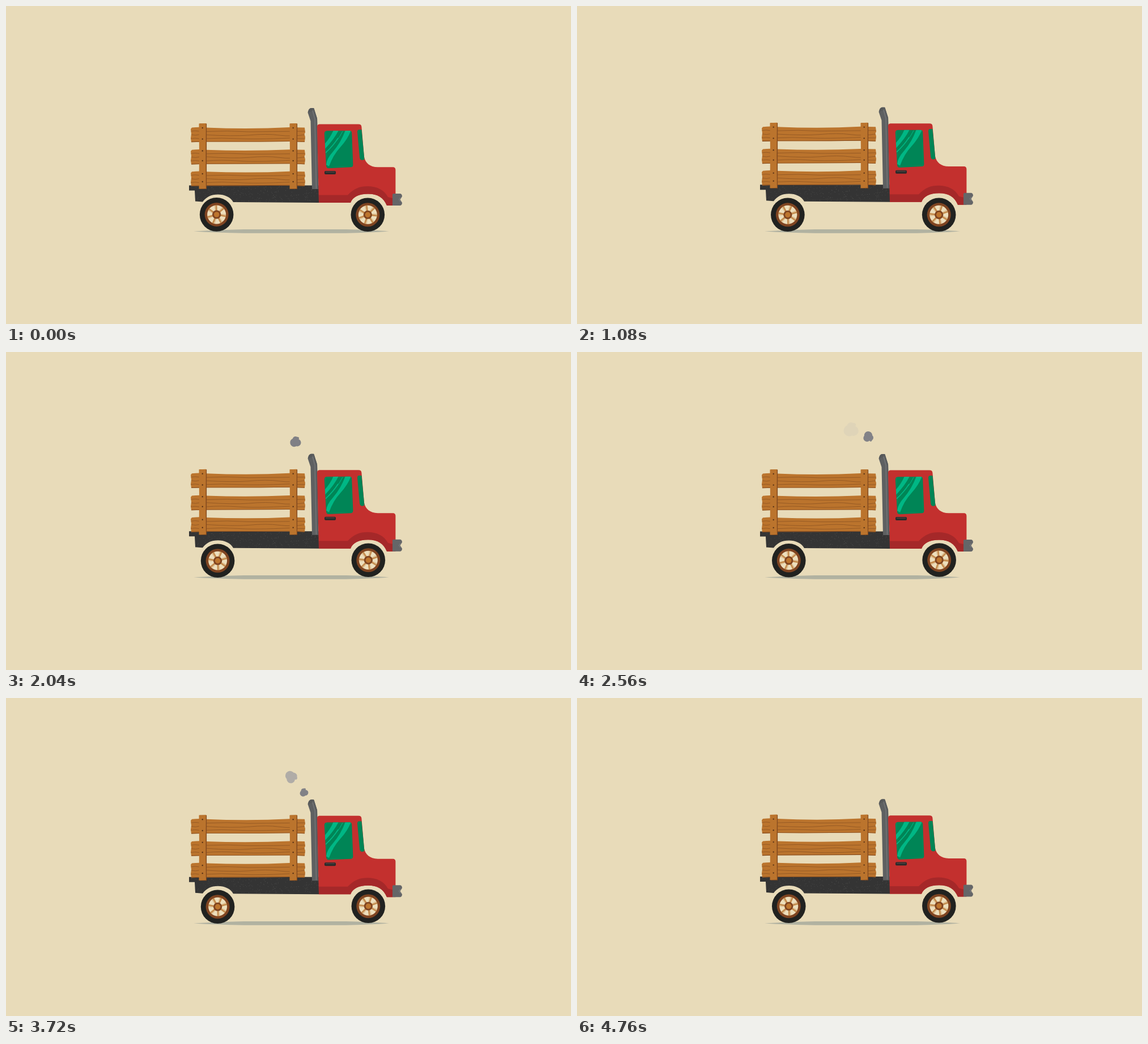
These frames come from a looping animation (997 by 561 pixels, 4800 ms). An HTML page with a canvas:

```html
<!DOCTYPE html>
<html lang="en">
<head>
<meta charset="utf-8">
<title>Truck</title>
<style>
html, body { margin: 0; width: 100%; height: 100%; overflow: hidden; background: #e8dbb9; }
canvas { display: block; }
</style>
</head>
<body>
<canvas id="stage" width="997" height="561"></canvas>
<script>
const ctx = document.getElementById('stage').getContext('2d');
const LOOP = 4800, STEP = 40, TAU = Math.PI * 2;
const CREAM = '#e8dbb9', WOOD = '#bb742d', WOOD_DARK = '#834a1f', GRAIN = '#8a5222';
const RED = '#c3302e', RED_DARK = '#a52829', GLASS = '#008556', SHINE = '#00b785';

function fill(d, color) {
  ctx.fillStyle = color;
  ctx.fill(new Path2D(d));
}

function line(d, color, width) {
  ctx.strokeStyle = color;
  ctx.lineWidth = width;
  ctx.stroke(new Path2D(d));
}

function disc(x, y, r, color) {
  ctx.fillStyle = color;
  ctx.beginPath();
  ctx.arc(x, y, r, 0, TAU);
  ctx.fill();
}

function clipped(d, draw) {
  ctx.save();
  ctx.clip(new Path2D(d));
  draw();
  ctx.restore();
}

function random(seed) {
  return () => {
    seed = (seed * 16807) % 2147483647;
    return seed / 2147483647;
  };
}

function drawShadow() {
  fill('M331 397.5 Q375 394.5 420 394 H600 Q640 394.5 676 397.5 Q640 400 600 400.8 H420 Q370 400 331 397.5Z', '#b1b2a1');
}

function drawPlank(y, sway) {
  const shape = `M326 3 L328 0.5 Q342 -1 353 0.5 Q430 ${3.5 + sway} 500 0 L527 0.5 L528 9 L526.5 12 L528 17
    L527 26 L500 25 Q425 ${25.5 + sway} 353 25.5 L327 26.3 L326 19 L327 12Z`;
  clipped(shape, () => {
    ctx.fillStyle = WOOD;
    ctx.fillRect(320, -3 + y, 212, 34);
  });
  ctx.save();
  ctx.translate(0, y);
  fill(shape, WOOD);
  clipped(shape, () => {
    line(`M326 7 Q334 5.5 341 7 M353 7.5 Q390 5.5 428 8 Q465 ${8 - sway} 528 7
      M326 13 Q335 15 341 13 M353 ${13 + sway} Q400 16 428 14 Q460 11 482 14 T528 13
      M326 20 Q334 18.5 341 20 M353 20 Q380 ${18 + sway} 410 20 T501 19 M513 20 H528`, GRAIN, 0.75);
    line(`M326 26 L353 25.5 Q425 ${25.5 + sway} 500 25 L528 26`, WOOD_DARK, 1.6);
  });
  ctx.restore();
}

function drawPost(x) {
  ctx.fillStyle = WOOD_DARK;
  ctx.fillRect(x + 1, 207.5, 12.6, 115.5);
  fill(`M${x} 207.5 L${x + 12.4} 207 L${x + 12} 265 L${x + 12.4} 322 L${x} 322.5 L${x + 0.5} 260Z`, WOOD);
  for (const y of [215, 234.7, 255.5, 273, 296, 310]) disc(x + 6.2, y, 1.2, '#5a3418');
}

function drawBed() {
  const shape = 'M323 316.5 H552 V347 L401 346 C396 337 386 332.5 374 332.5 C362 332.5 353 337 347 345.5 L334 344.5 L333 325.5 H323Z';
  clipped(shape, () => {
    ctx.fillStyle = '#343434';
    ctx.fillRect(320, 315, 235, 35);
    const next = random(71);
    ctx.fillStyle = '#545452';
    for (let i = 0; i < 230; i++) {
      ctx.fillRect(324 + next() * 227, 318 + next() * 28, 0.8, 0.8);
    }
  });
}

function drawPipe() {
  fill('M532.5 188 Q534 180.5 538 180 L543 180 L549 198 L551.5 323 H540 L537.5 203Z', '#5e6061');
  line('M541 185 L545 200 L547.5 322', '#76787a', 1.3);
  line('M543 180.5 L548.6 199 L551 322', '#505355', 1);
  fill('M533 188 Q534 181 538 180 L543 180 L538.5 186Z', '#565859');
}

function drawCab() {
  const body = `M549 213 Q549 209 553 208.6 H622 Q627 208.6 627.4 213 L632 266 C634 277 642 284 656 284.4
    H683 Q687 284.4 687.4 289 V352 H672 C666 338 656 331.6 639 331.6 C622 331.6 612 337 608 347 H552Z`;
  clipped(body, () => {
    ctx.fillStyle = RED;
    ctx.fillRect(545, 205, 145, 150);
    fill('M552 333.5 H603 C614 322 624 318 638 318 C654 318 667 324 674 337 L682 339 V353 H552Z', RED_DARK);
  });

  const pane = 'M561.8 225 Q562 220.5 566 220.2 L606 220 Q610 220 610.2 224 L612.4 280 Q612.4 284 609 284.4 L569 286.3 Q565.5 286 565 282Z';
  clipped(pane, () => {
    ctx.fillStyle = GLASS;
    ctx.fillRect(558, 216, 58, 74);
    fill('M578 219 H587 Q580 234 563 252 L562.5 243 Q572 233 578 219Z', SHINE);
    fill('M599 219 H609 Q603 235 590 249 Q577 263 570 283 L565 280 Q566 269 577 257 Q591 241 599 219Z', SHINE);
    line('M586 233 Q578 246 564 259', SHINE, 1.6);
    line('M594 221 Q589 231 584 237', SHINE, 1);
  });
  fill('M620 222 Q620 218.5 623 218.3 H627.4 L632.4 270.8 Q626 274 624.2 268Z', GLASS);

  ctx.fillStyle = '#2b2b2b';
  ctx.beginPath();
  ctx.roundRect(562, 291, 20, 6, 2);
  ctx.fill();
  line('M564 293 H580', '#67504c', 0.9);

  fill('M682 332.5 Q682 331 684 331 H696 Q699 332 699 336 L695.5 341.5 L699 347 Q699 351 696 352 H682Z', '#656668');
  line('M696 338 L693.5 341.5 L696 345', '#858687', 1);
}

function drawSpokes(angle) {
  ctx.beginPath();
  for (let i = 0; i < 7; i++) {
    const a = angle + i * TAU / 7;
    ctx.moveTo(0, 0);
    ctx.lineTo(17 * Math.cos(a), 17 * Math.sin(a));
  }
  ctx.stroke();
}

// The wheel sits slightly off its axle, so it circles while it spins.
function drawWheel(x, y, wobble, phase, time) {
  const turn = time / 560 * TAU + phase;
  ctx.save();
  ctx.translate(x + wobble * Math.cos(turn), y + wobble * Math.sin(turn));
  disc(0, 0, 29.8, '#212220');
  disc(0, 0, 21, '#7f4421');
  disc(0, 0, 16.5, '#eddfbd');
  ctx.strokeStyle = '#b9742f';
  ctx.lineWidth = 2.8;
  ctx.globalAlpha = 0.25;
  drawSpokes(turn - 0.16);
  ctx.globalAlpha = 0.75;
  drawSpokes(turn);
  ctx.globalAlpha = 1;
  disc(0, 0, 7.6, '#7f4421');
  disc(0, 0, 4.7, '#bd752e');
  ctx.restore();
}

const puffs = [
  { start: 240, life: 760, x: 511, y: 140, size: 0.96, tilt: 0 },
  { start: 1240, life: 760, x: 505, y: 138, size: 1, tilt: 2 },
  { start: 1820, life: 760, x: 484, y: 138, size: 1.2, tilt: 5.3 },
  { start: 2200, life: 760, x: 504, y: 138, size: 1, tilt: 1 },
  { start: 3060, life: 760, x: 502, y: 139, size: 1, tilt: 0.3 },
  { start: 3540, life: 560, x: 516, y: 156, size: 0.9, tilt: 5 },
  { start: 4200, life: 520, x: 503, y: 138, size: 0.95, tilt: 3 }
];

function drawPuff({ start, life, x, y, size, tilt }, time) {
  const age = (time - start) / life;
  if (age <= 0 || age >= 1) return;
  const rise = 1 - (1 - age) ** 2;
  const scale = (5 + 5.5 * rise) * size / 10;
  const shade = 128 + 48 * age ** 4;
  ctx.save();
  ctx.globalAlpha = Math.min(1, (1 - age) / 0.18);
  ctx.translate(538 + (x - 538) * rise, 180 + (y - 180) * rise);
  ctx.rotate(tilt);
  ctx.scale(scale, scale);
  ctx.fillStyle = `rgb(${shade}, ${shade}, ${shade + 5})`;
  ctx.beginPath();
  for (const [cx, cy, r] of [[-2, -2, 8], [1, 3, 7], [4, -3, 6], [8.5, -1, 2.5]]) {
    ctx.moveTo(cx + r, cy);
    ctx.arc(cx, cy, r, 0, TAU);
  }
  ctx.fill();
  ctx.restore();
}

function draw(time) {
  ctx.fillStyle = CREAM;
  ctx.fillRect(0, 0, 997, 561);
  drawShadow();
  puffs.forEach(puff => drawPuff(puff, time));

  ctx.save();
  ctx.translate(0, 0.8 * (Math.cos(time / 640 * TAU - 0.35) - 1));
  drawBed();
  drawPipe();
  drawPlank(214, 0.4);
  drawPlank(253.3, -0.3);
  drawPlank(291.7, 0);
  drawPost(340.5);
  drawPost(500.5);
  drawCab();
  ctx.restore();

  drawWheel(372.7, 367.6, 1.1, 2.88, time);
  drawWheel(638.6, 367.5, 0.8, 1.9, time);
}

const begin = performance.now();
function tick() {
  const time = (performance.now() - begin) % LOOP;
  draw(Math.floor(time / STEP) * STEP);
  requestAnimationFrame(tick);
}
tick();
</script>
</body>
</html>
```
